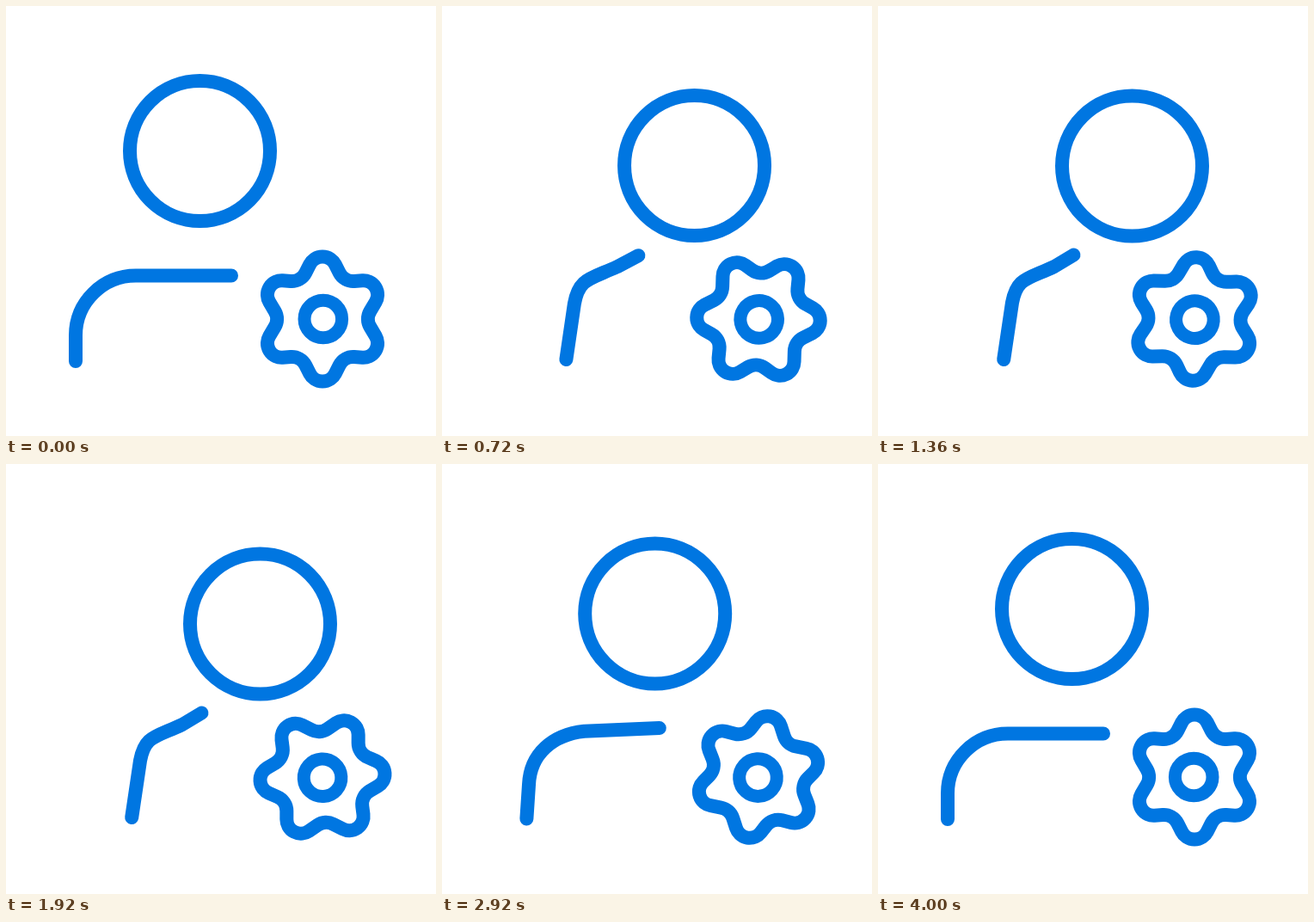
Write an HTML page with a canvas that moves like this. It is 500x500 px and loops after 4.04 s.

```html
<!DOCTYPE html>
<html>
<head>
<meta charset="utf-8">
<style>
html, body { margin: 0; height: 100%; overflow: hidden; background: #fff; }
canvas { display: block; }
</style>
</head>
<body>
<canvas id="stage" width="500" height="500"></canvas>
<script>
const ctx = document.getElementById('stage').getContext('2d');
const LOOP = 4040, STEP = 40;

// Shoulder: end, bend, two handles, joint, end
const restArm = [[81, 413], [81, 383], [81, 344.5], [112.5, 313.5], [151, 313.5], [262, 313.5]];
const movedArm = [[146.2, 411], [156, 345], [161.5, 316], [173, 318], [205, 303], [227.5, 289.5]];

const mix = (a, b, k) => a + (b - a) * k;
const ease = (t, start, length) => {
  const u = Math.min(1, Math.max(0, (t - start) / length));
  return u * u * (3 - 2 * u);
};
const shift = (t, back) => ease(t, 0, 800) - ease(t, back, 900);
const polar = (deg, r) => {
  const a = deg * Math.PI / 180;
  return [r * Math.cos(a), r * Math.sin(a)];
};

// Gear corners: tooth tips alternate with valleys
const corners = [];
[-90, -31, 31, 90, 149, 211].forEach((deg, i) => {
  corners.push([...polar(deg, i % 3 ? 90.6 : 92.5), 16.5]);
  corners.push([...polar(-60 + i * 60, 50), 18]);
});

function ring(x, y, r, width) {
  ctx.lineWidth = width;
  ctx.beginPath();
  ctx.arc(x, y, r, 0, 2 * Math.PI);
  ctx.stroke();
}

function shoulder(k) {
  const p = restArm.map(([x, y], i) => [mix(x, movedArm[i][0], k), mix(y, movedArm[i][1], k)]);
  ctx.beginPath();
  ctx.moveTo(...p[0]);
  ctx.lineTo(...p[1]);
  ctx.bezierCurveTo(...p[2], ...p[3], ...p[4]);
  ctx.lineTo(...p[5]);
  ctx.stroke();
}

function gear(angle) {
  ctx.save();
  ctx.translate(368, 364);
  ctx.rotate(angle);
  ctx.beginPath();
  const n = corners.length, a = corners[n - 1], b = corners[0];
  ctx.moveTo(mix(a[0], b[0], 0.3), mix(a[1], b[1], 0.3));
  corners.forEach(([x, y, r], i) => {
    const next = corners[(i + 1) % n];
    ctx.arcTo(x, y, next[0], next[1], r);
  });
  ctx.closePath();
  ctx.stroke();
  ring(0.8, 0, 21.8, 15);
  ctx.restore();
}

function draw(now) {
  const t = Math.floor(now % LOOP / STEP) * STEP;
  ctx.fillStyle = '#fff';
  ctx.fillRect(0, 0, 500, 500);
  ctx.strokeStyle = '#0076e1';
  ctx.lineCap = ctx.lineJoin = 'round';
  const k = shift(t, 2358);
  ring(mix(225.5, 295.5, k), mix(168.5, 186, k), 81.5, 16);
  shoulder(shift(t, 2325));
  gear(Math.PI * t / 4000);
}

let start;
function tick(now) {
  start ??= now;
  draw(now - start);
  requestAnimationFrame(tick);
}
draw(0);
requestAnimationFrame(tick);
</script>
</body>
</html>
```
